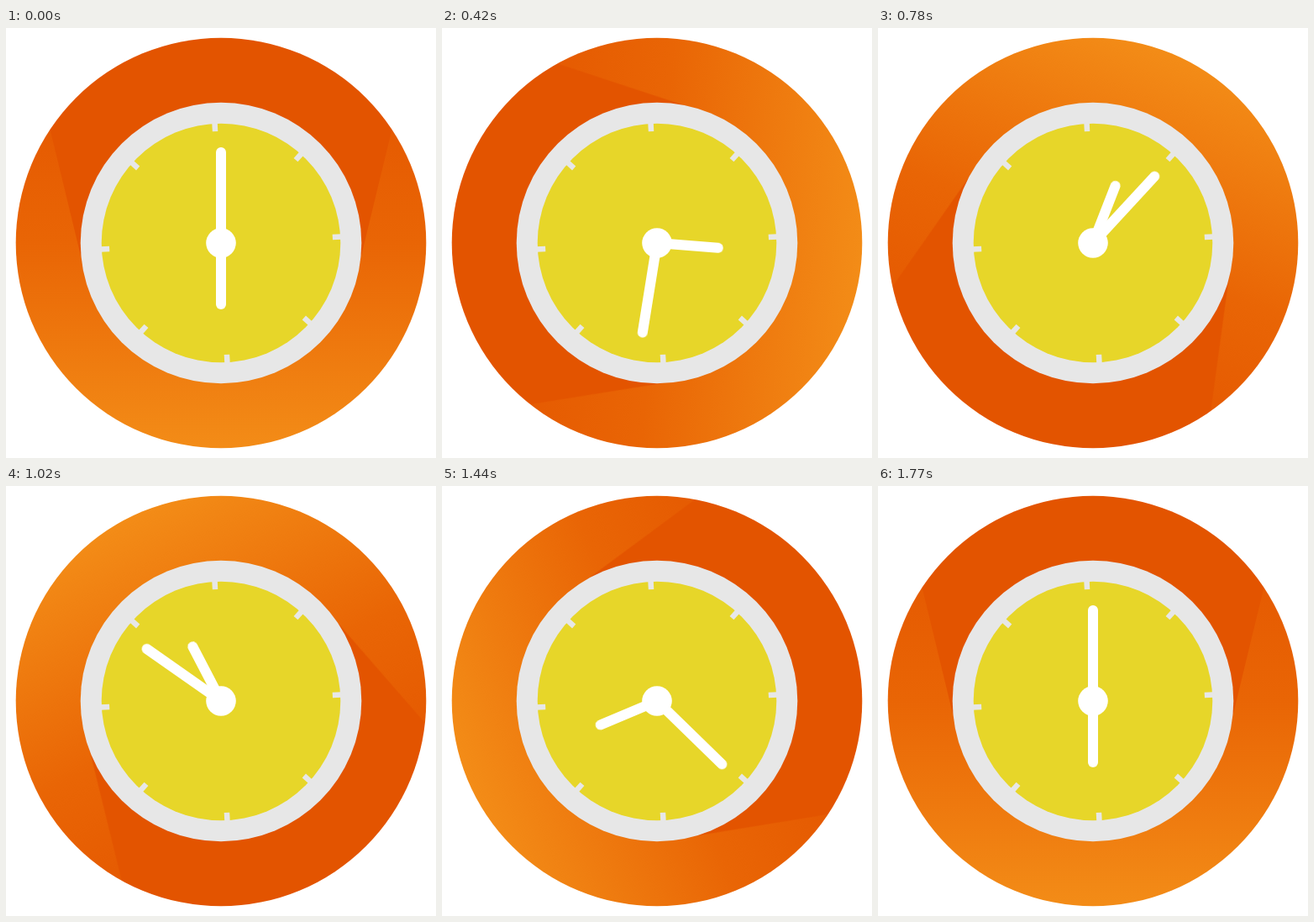
An HTML page without scripts that plays this animation: 512x512 px, repeating every 1.8 s.

```html
<!DOCTYPE html>
<html lang="en">
<head>
<meta charset="utf-8">
<title>Clock</title>
<style>
  html, body { margin: 0; width: 100%; height: 100%; overflow: hidden; background: #fff; }
  svg { display: block; width: 100vw; height: 100vh; }
  .spin {
    transform-origin: 0 0;
    animation: spin 1800ms -1ms infinite;
  }
  .light, .hour { --turn: -360deg; }
  .minute { --turn: -720deg; }
  .hand { stroke: #fff; stroke-width: 12; stroke-linecap: round; }
  /* 60 poses, the last one equal to the first */
  @keyframes spin {
    0% { transform: rotate(0deg); animation-timing-function: steps(59, end); }
    98.3333%, 100% { transform: rotate(var(--turn)); }
  }
</style>
</head>
<body>
<svg viewBox="-256 -256 512 512">
  <defs>
    <linearGradient id="glow" gradientUnits="userSpaceOnUse" x1="0" y1="-200" x2="0" y2="244">
      <stop offset="0" stop-color="#e45600"/>
      <stop offset=".45" stop-color="#e96505"/>
      <stop offset="1" stop-color="#f38c17"/>
    </linearGradient>
    <clipPath id="disc"><circle r="244.3"/></clipPath>
    <path id="tick" d="M0-144V-133"/>
    <g id="pair">
      <use href="#tick"/>
      <use href="#tick" transform="rotate(180)"/>
    </g>
  </defs>

  <g clip-path="url(#disc)">
    <g class="spin light">
      <circle r="250" fill="url(#glow)"/>
      <path d="M-161 40L-239-282H239L161 40Z" fill="#e35400"/>
    </g>
  </g>

  <circle r="167.3" fill="#e7e7e7"/>
  <circle r="142.3" fill="#e7d629"/>
  <g stroke="#e7e7e7" stroke-width="6.5" transform="rotate(-3)">
    <use href="#pair"/>
    <use href="#pair" transform="rotate(45)"/>
    <use href="#pair" transform="rotate(90)"/>
    <use href="#pair" transform="rotate(135)"/>
  </g>

  <g class="spin hour"><path class="hand" d="M0 0V73"/></g>
  <g class="spin minute"><path class="hand" d="M0 0V-108"/></g>
  <circle r="17.8" fill="#fff"/>
</svg>
</body>
</html>
```
